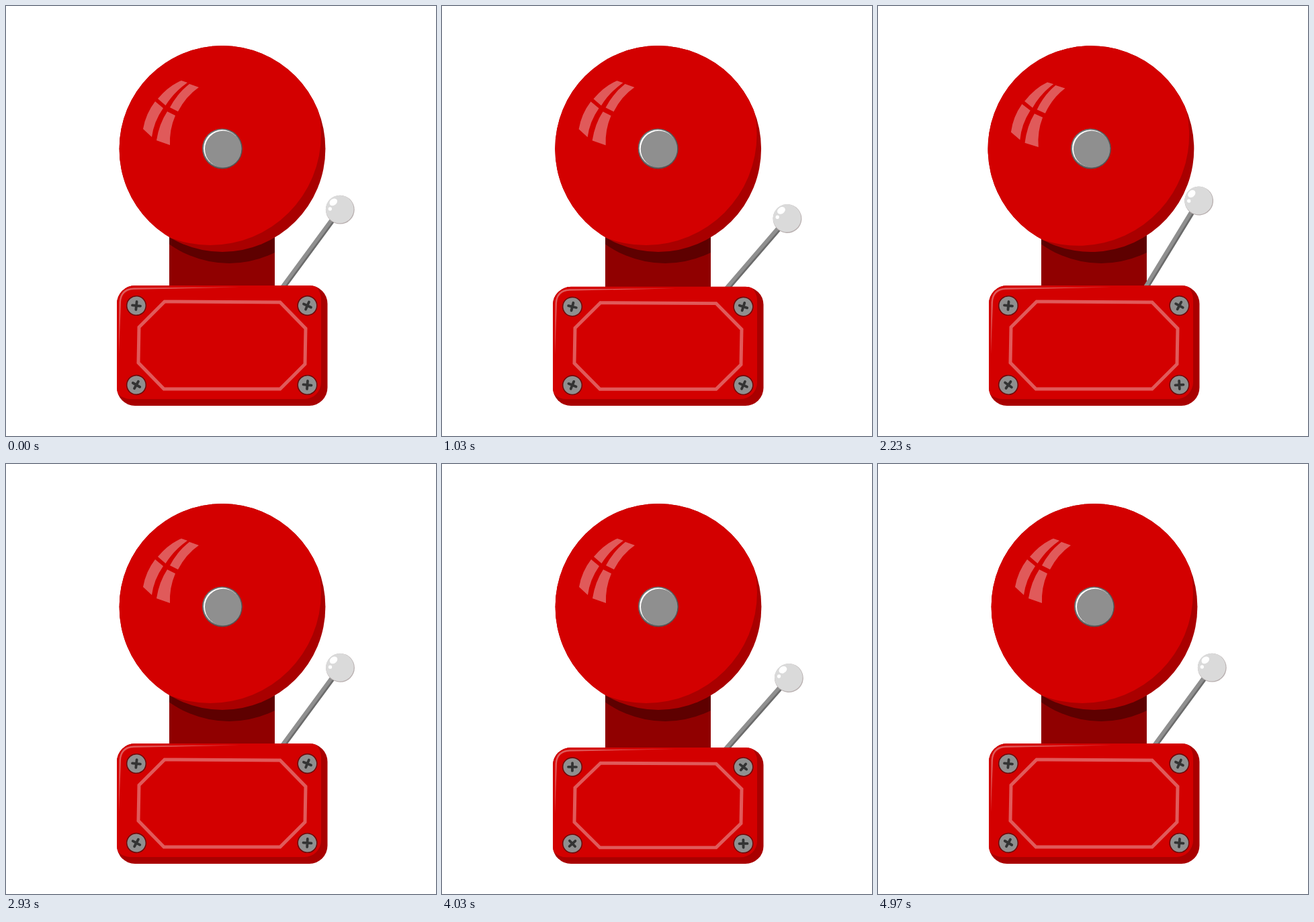
These frames come from a looping animation (640 px wide and 640 px high, 5230 ms). An HTML page:

```html
<!DOCTYPE html>
<html lang="en">
<head>
<meta charset="utf-8">
<title>Alarm bell</title>
<style>
  html, body { margin: 0; width: 100%; height: 100%; overflow: hidden; background: #fff; }
  svg { display: block; width: 100%; height: 100%; }
  .lit { fill: #d30000; }
  .dim { fill: #a90000; }
  .shine { fill: #e05a5a; }
  .steel { fill: #8f8f8f; }
</style>
</head>
<body>
<svg viewBox="0 0 640 640">
  <defs>
    <clipPath id="bellEdge"><circle cx="322" cy="212.5" r="153.4"/></clipPath>
    <clipPath id="postEdge"><path d="M243 300H400V440H243Z"/></clipPath>
    <clipPath id="boxEdge"><rect x="165" y="416" width="313.5" height="179" rx="27"/></clipPath>
    <g id="screw">
      <circle r="14.3" fill="#8f8f8f" stroke="#6e0a0a" stroke-width="1.6"/>
      <path d="M-6 0H6M0 -6V6" stroke="#333" stroke-width="3.8" stroke-linecap="round"/>
    </g>
  </defs>

  <g clip-path="url(#postEdge)">
    <path d="M243 300H400V440H243Z" fill="#900000"/>
    <circle cx="332" cy="230" r="153" fill="#5e0000"/>
  </g>

  <g id="bell">
    <g clip-path="url(#bellEdge)">
      <circle class="dim" cx="322" cy="212.5" r="155"/>
      <circle class="lit" cx="304" cy="191" r="165"/>
    </g>
    <g class="shine">
      <path d="M261 111L270 114Q250 128 237.500 148L226 138Q242 119 261 111Z"/>
      <path d="M273 116L287 121Q268 134 256 157L244 151Q255 130 273 116Z"/>
      <path d="M222 142L234 152Q220 172 217 195L204 183Q208 160 222 142Z"/>
      <path d="M240 157L252 163Q243 184 244 207L224 200Q228 175 240 157Z"/>
    </g>
    <circle cx="322" cy="212.500" r="30" fill="#555"/>
    <circle cx="321.300" cy="211.700" r="29" fill="#777"/>
    <circle cx="321.600" cy="211.800" r="27.500" fill="#fff"/>
    <circle class="steel" cx="323.200" cy="213" r="27.200"/>
  </g>

  <g id="hammer">
    <path d="M334 525L492 310" stroke="#8f8f8f" stroke-width="8"/>
    <path d="M336.300 526.700L494.300 311.700" stroke="#6c6c6c" stroke-width="2.600"/>
    <circle cx="497.300" cy="303.200" r="21.400" fill="#b9b0b0"/>
    <circle cx="496.700" cy="302.500" r="20.800" fill="#dadada"/>
    <g fill="#fff">
      <ellipse cx="487.300" cy="291.800" rx="6.300" ry="4.800" transform="rotate(-38 487.300 291.800)"/>
      <circle cx="482.300" cy="302" r="2.700"/>
    </g>
  </g>

  <g id="box">
    <g clip-path="url(#boxEdge)">
      <path class="dim" d="M165 416H479V595H165Z"/>
      <rect class="lit" x="160" y="411" width="309" height="174" rx="25"/>
      <path class="shine" d="M168 518L168.500 441Q170 420 190 419.500L348 418.500L190 422Q172 423 171 441Z"/>
    </g>
    <path d="M236 440L408 441L446 480L445 533L408 570L235 570L197 531L198 478Z"
          fill="none" stroke="#e05a5a" stroke-width="5"/>
    <g id="screws"></g>
  </g>
</svg>
<script>
const LOOP = 5230, PERIOD = 90, STEP = 40;
const RINGS = [{ from: 351.5, to: 2421.5 }, { from: 2911.4, to: 4960 }];
const SWING_OUT = 5.1, SWING_IN = -4.9, BELL_TILT = -2.2, SQUASH = 6.3;

// place, resting angle, wobble in degrees and its length in steps
const SCREWS = [
  { x: 194, y: 446, rest: 6, wobble: 10, span: 48 },
  { x: 448.5, y: 446, rest: 24, wobble: -14, span: 16 },
  { x: 194, y: 564, rest: 30, wobble: -17, span: 16 },
  { x: 448.5, y: 564, rest: 5, wobble: -32, span: 19.2 }
];

const el = id => document.getElementById(id);
const move = (node, value) => node.setAttribute("transform", value);
const ease = u => u < 0.5 ? 8 * u ** 4 : 1 - 8 * (1 - u) ** 4;

const screwNodes = SCREWS.map(() => {
  const use = document.createElementNS("http://www.w3.org/2000/svg", "use");
  use.setAttribute("href", "#screw");
  return el("screws").appendChild(use);
});

function pose(time) {
  const ring = RINGS.find(r => time > r.from && time < r.to);
  if (!ring) return { swing: 0, tilt: 0, squash: 0, steps: 0 };
  const age = time - ring.from;
  const turn = age / PERIOD - 0.5;               // whole numbers: hammer fully out
  const phase = turn - Math.round(turn);
  const inward = ease(Math.min(1, Math.abs(phase) * 2));
  // the first and last half swings meet the resting position
  const edge = age < PERIOD / 2 || age > 22.5 * PERIOD;
  return {
    swing: SWING_OUT + ((edge ? 0 : SWING_IN) - SWING_OUT) * inward,
    tilt: edge ? 0 : BELL_TILT * inward,
    squash: SQUASH * Math.max(0, 1 - Math.abs(phase - 0.03) / 0.17),
    steps: age / STEP
  };
}

function draw(time) {
  // 25 drawings a second, shown on a 30 per second clock
  const tick = Math.floor((time + 3.4) * 0.03);
  const p = pose(Math.ceil(tick * 5 / 6 - 0.5) * STEP);
  move(el("bell"), `rotate(${p.tilt} 322 344)`);
  move(el("hammer"), `rotate(${p.swing} 334 525)`);
  move(el("box"), `translate(0 595) scale(1 ${1 - p.squash / 179}) translate(0 -595)`);
  SCREWS.forEach((s, i) => {
    const angle = s.rest + s.wobble * Math.sin(2 * Math.PI * p.steps / s.span);
    move(screwNodes[i], `translate(${s.x} ${s.y}) rotate(${angle})`);
  });
}

const start = performance.now();
function frame() {
  draw((performance.now() - start) % LOOP);
  requestAnimationFrame(frame);
}
frame();
</script>
</body>
</html>
```
